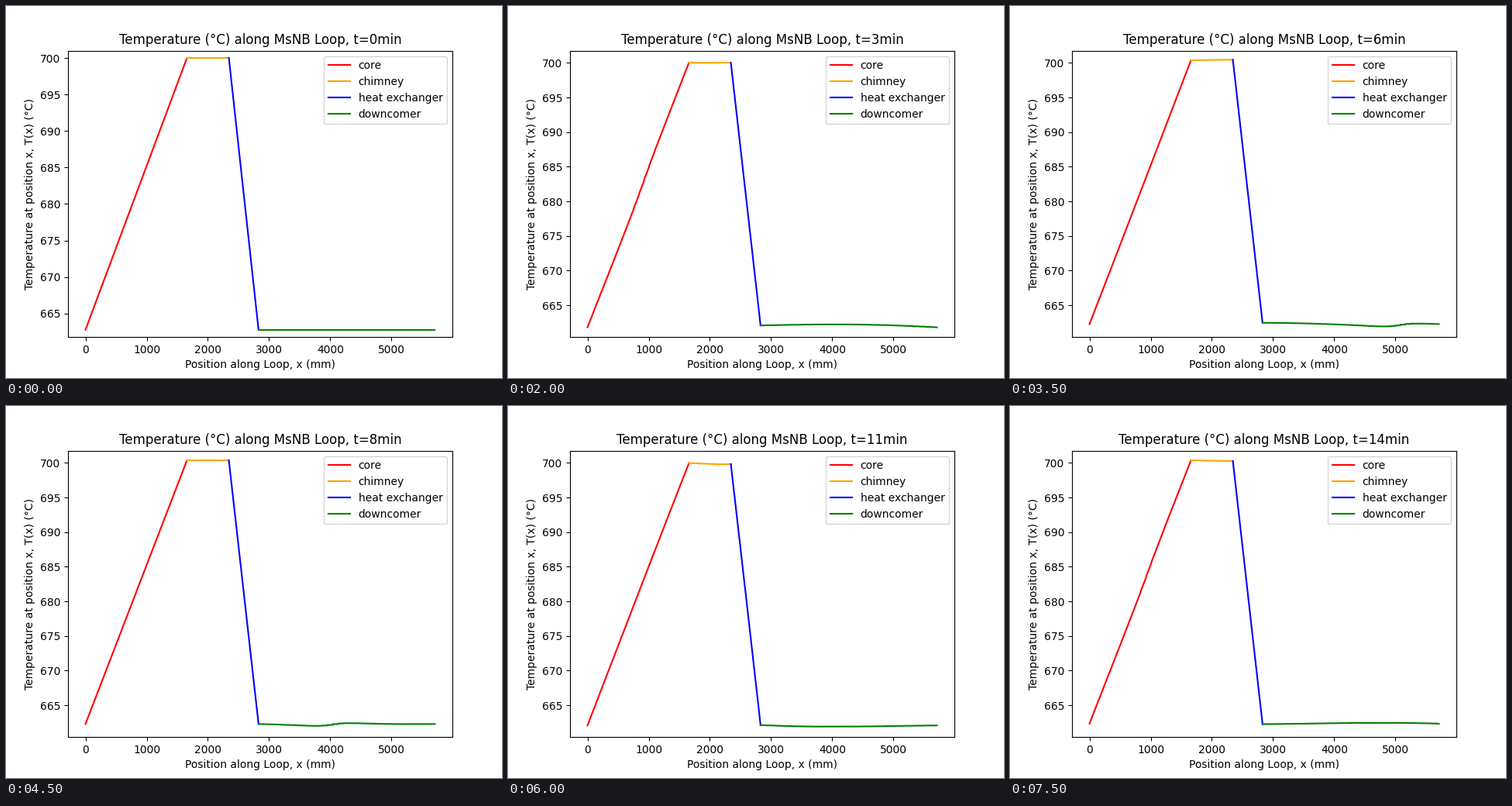
These frames come from a looping animation (640x480 px, 8 s). A matplotlib script:

```python
import numpy as np
import matplotlib.pyplot as plt
from matplotlib.animation import FuncAnimation

# Section ends along the loop (mm)
CORE, CHIMNEY, EXCHANGER, LOOP = 1658, 2343, 2828, 5710
LAP = 66  # seconds for one trip around the loop
SPEED = LOOP / LAP
START, START_RISE = 662.78, 37.22
BASE, DROP = 662.0, 38.0

SECTIONS = [
    ("core", "red", 0, CORE),
    ("chimney", "orange", CORE, CHIMNEY),
    ("heat exchanger", "blue", CHIMNEY, EXCHANGER),
    ("downcomer", "green", EXCHANGER, LOOP),
]
FRONTS = 4 + LAP * np.arange(15)  # times when the starting front comes by


def wave(seconds, period, peak):
    return np.cos(2 * np.pi * (seconds - peak) / period)


def outlet(seconds):
    """Exchanger outlet temperature of the one-second parcel leaving now."""
    s = np.floor(seconds) + 0.5
    fade = np.exp(-s / 150)
    drift = 0.17 + 0.1 * fade + 0.19 * wave(s, 430, 410)
    swing = (0.14 + 0.25 * fade) * wave(s, 65, 34)
    # Each front is a rise, a steep fall and a recovery
    z = s[:, None] - FRONTS
    tail = (8 + 12 * fade)[:, None]
    front = (np.tanh(z / 3) * np.exp(-np.abs(z) / tail)).sum(axis=1)
    return BASE + drift + swing - (0.4 + 0.4 * fade) * front


def temperature(x, minute):
    heated = np.clip(x / CORE, 0, 1)
    cooled = np.clip((x - CHIMNEY) / (EXCHANGER - CHIMNEY), 0, 1)
    if minute == 0:
        return START + START_RISE * (heated - cooled)
    leaving = 60 * minute + (EXCHANGER - x) / SPEED
    ahead = outlet(leaving) + DROP * (1 - cooled)
    behind = outlet(leaving - LAP)
    return behind * (1 - heated) + ahead * heated


fig, ax = plt.subplots(figsize=(6.4, 4.8), dpi=100)
curves = []
for name, color, begin, end in SECTIONS:
    x = np.linspace(begin, end, (end - begin) // 5 + 1)
    line, = ax.plot(x, temperature(x, 0), color=color, label=name)
    curves.append((line, x))
ax.set_xlim(-0.05 * LOOP, 1.05 * LOOP)
ax.set_xlabel("Position along Loop, x (mm)")
ax.set_ylabel("Temperature at position x, T(x) (°C)")
ax.legend(loc="upper right")


def update(frame):
    minute = max(0, frame - 1)
    for line, x in curves:
        line.set_ydata(temperature(x, minute))
    if minute == 0:
        ax.set_ylim(START - 1, START + START_RISE + 1)
    else:
        ax.set_ylim(660.40, 701.77)
    ax.set_title(f"Temperature (°C) along MsNB Loop, t={minute}min")
    return [line for line, _ in curves]


anim = FuncAnimation(fig, update, frames=16, interval=500,
                     init_func=lambda: update(0), repeat=True, repeat_delay=0)
plt.show()
```
